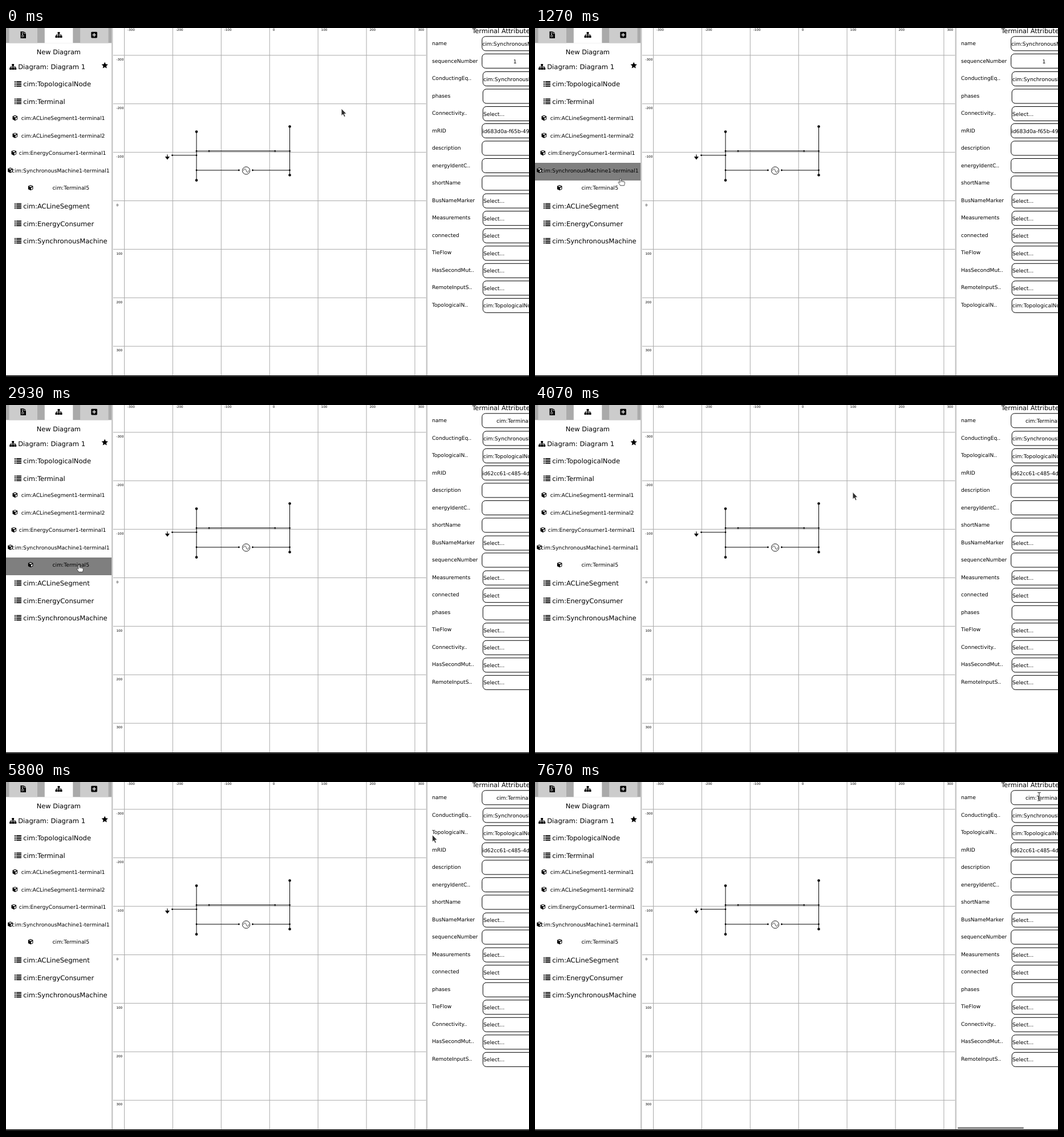
Recreate the animation shown at these times as an HTML page. Size 917 px wide and 611 px high, loop 8000 ms.

```html
<!DOCTYPE html>
<html lang="en">
<head>
<meta charset="utf-8">
<title>Diagram editor</title>
<style>
html, body { margin: 0; width: 100%; height: 100%; overflow: hidden; background: #fff; }
svg { display: block; width: 917px; height: 611px; }
text { font-family: "DejaVu Sans", sans-serif; text-rendering: geometricPrecision; fill: #000; white-space: pre; }
</style>
</head>
<body>
<svg viewBox="0 0 917 611" xmlns="http://www.w3.org/2000/svg">
  <defs>
    <path id="list" d="M0 1H2M0 3.7H2M0 6.4H2M0 9.1H2M3 1H12M3 3.7H12M3 6.4H12M3 9.1H12" stroke="#000" stroke-width="1.7"/>
    <g id="cube">
      <path d="M0-4.6L4.3-2.9V2.6L0 4.7-4.3 2.6V-2.9Z"/>
      <path d="M0-3.4L3-2.2 0-1 -3-2.2ZM.7.3L3.3-.8V2L.7 3.3Z" fill="#fff"/>
    </g>
    <g id="tree">
      <path d="M-1.9-5H1.9V-1.5H-1.9ZM-6 1.6H-2.3V5H-6ZM-1.9 1.6H1.9V5H-1.9ZM2.3 1.6H6V5H2.3Z"/>
      <path d="M0-2V2M-4.2 2V0H4.2V2" fill="none" stroke="#000" stroke-width="1.1"/>
    </g>
    <path id="ibeam" d="M-2.8-7.2H-1Q0-7.2 0-6.2 0-7.2 1-7.2H2.8M0-6.4V6.4M-2.8 7.2H-1Q0 7.2 0 6.2 0 7.2 1 7.2H2.8"/>
  </defs>
  <g id="side"></g>
  <g id="canvas"></g>
  <g id="before"></g>
  <g id="after"></g>
  <rect y="608" width="917" height="3" fill="#242424"/>
  <rect id="bar" x="741" y="604.4" width="116" height="2.6" rx="1.3" fill="#707070"/>
  <g id="arrow">
    <path d="M0 0V12.7L2.9 10.1 4.9 14.7 7.1 13.7 5.1 9.3H9Z" fill="#2e2e2e" stroke="#fff" stroke-width=".9"/>
  </g>
  <g id="hand" stroke="#222" stroke-width=".8">
    <path d="M-1.2 1C-1.2-.5 1-.5 1 1V4.6C1.6 3.8 2.9 4 3.1 4.9 3.8 4.3 5 4.6 5.2 5.5 6.1 5 7.3 5.4 7.3 6.6V9C7.3 10.3 6.5 10.7 6.4 12.3H-.6C-1 10.6-3.4 8.4-4 6.8-4.2 5.8-3 5.4-2.3 6.2L-1.2 7.4Z" fill="#fff"/>
    <path d="M1 4.6V6.6M3.1 5V6.6M5.2 5.6V6.8" stroke-width=".5"/>
  </g>
  <g id="beam" fill="none">
    <use href="#ibeam" stroke="#fff" stroke-width="2"/>
    <use href="#ibeam" stroke="#222"/>
  </g>
</svg>
<script>
const $ = id => document.getElementById(id);
const ROW = 30.53, SIDE = 185, LOOP = 8000;

const text = (x, y, size, s, anchor = 'start') =>
  `<text x="${x}" y="${y}" font-size="${size}" text-anchor="${anchor}">${s}</text>`;
const rect = (x, y, w, h, fill) =>
  `<rect x="${x}" y="${y}" width="${w}" height="${h}" fill="${fill}"/>`;
const path = (d, stroke = '#000', width = 1) =>
  `<path d="${d}" fill="none" stroke="${stroke}" stroke-width="${width}"/>`;
const dot = (x, y, r) => `<circle cx="${x}" cy="${y}" r="${r}"/>`;
const use = (id, x, y) => `<use href="#${id}" x="${x}" y="${y}"/>`;

function tabs() {
  const fills = ['#ccc', '#fff', '#ccc'];
  return rect(0, 0, SIDE, 26.3, '#aaa') +
    fills.map((f, i) => rect(5.5 + 62.3 * i, 0, 49.5, 26.5, f)).join('') +
    '<path d="M25.5 6H31.7L35 9.3V18H25.5Z"/>' +
    path('M31.4 6V9.6H35', '#ccc', .8) + path('M28.8 7V12', '#ccc', 1.2) +
    '<circle cx="29.4" cy="14" r="1.7" fill="none" stroke="#ccc"/>' +
    use('tree', 92.5, 12) +
    '<rect x="149.3" y="6.8" width="10.6" height="10.6" rx="1.4"/>' +
    path('M154.6 9V15.2M151.5 12.1H157.7', '#ccc', 1.9);
}

function star(cx, cy) {
  const points = Array.from({ length: 10 }, (_, i) => {
    const a = i * Math.PI / 5, r = i % 2 ? 2.8 : 6;
    return [cx + r * Math.sin(a), cy - r * Math.cos(a)];
  });
  return `<polygon points="${points.join(' ')}"/>`;
}

const tree = [
  'TopologicalNode', 'Terminal', '-ACLineSegment1-terminal1', '-ACLineSegment1-terminal2',
  '-EnergyConsumer1-terminal1', '-SynchronousMachine1-terminal1', '-Terminal5',
  'ACLineSegment', 'EnergyConsumer', 'SynchronousMachine'
];

function sidebar() {
  let s = tabs() + `<rect id="hover" width="${SIDE}" height="31" fill="#7f7f7f"/>`;
  s += text(92.4, 45.7, 11.35, 'New Diagram', 'middle');
  s += use('tree', 12.2, 68) + text(21.2, 71.9, 11.57, 'Diagram: Diagram 1') + star(173.2, 65.6);
  tree.forEach((name, i) => {
    const y = 102.4 + ROW * i;
    s += name[0] === '-'
      ? `<g class="leaf">${use('cube', 0, y - 6)}${text(0, y - 2.4, 9.22, 'cim:' + name.slice(1))}</g>`
      : use('list', 15, y - 9.6) + text(30.2, y, 11.55, 'cim:' + name);
  });
  return s;
}

// Spread icon and label evenly over the row
function spread(leaf) {
  const [icon, label] = leaf.children;
  const gap = (SIDE - 3.6 - label.getComputedTextLength()) / 3;
  icon.setAttribute('x', gap + 4.2);
  label.setAttribute('x', 2 * gap + 3.6);
}

function diagram() {
  let s = rect(185, 0, 2.4, 608, '#c6c6c6') + rect(736.6, 0, 2.4, 608, '#c6c6c6');
  for (let i = 0; i < 7; i++) {
    const x = 207.5 + 84.9 * i, y = 47.8 + 84.9 * i, n = (i - 3) * 100;
    s += path(`M${x} 0V608M188 ${y}H736.6`, '#aaa');
    s += text(x + 5.5, 5.4, 5.6, n) + text(193.5, y + 9.2, 5.6, n);
  }
  const left = 334, right = 497.5;
  const bus = (x, y) => path(`M${x} ${y}v85`) + dot(x, y, 2.3) + dot(x, y + 85, 2.3);
  const wire = (a, b, y) => path(`M${a} ${y}H${b}`) + dot(a, y, 1.4) + dot(b, y, 1.4);
  s += bus(left, 181.6) + bus(right, 172.5);
  s += wire(left, right, 215.4) + wire(356, 471.7, 215.4) + wire(291.5, left, 222.8);
  s += wire(left, 408.4, 249) + wire(432.4, right, 249);
  s += path('M282.9 221.5V226', '#000', 1.2) + '<path d="M278.8 225.2H287L282.9 230.4Z"/>';
  s += '<circle cx="421.1" cy="249.6" r="6.6" fill="#fff" stroke="#000" stroke-width=".9"/>' +
    path('M416.6 249.8C418 245.4 419.6 245.4 421.1 249.6S424.2 253.8 425.6 249.4', '#000', .8);
  return s;
}

const field = (name, value = '', x = 835.2) => ({ name, value, x, shift: 0 });
const pick = (name, value = 'Select...') => ({ name, value, x: 837, shift: 1 });

function panel(fields) {
  let s = text(817.4, 9, 11.3, 'Terminal Attributes');
  fields.forEach(({ name, value, x, shift }, i) => {
    const y = ROW * i;
    s += text(747, 30 + y, 9.1, name);
    s += `<rect x="${834.7 + shift * 1.5}" y="${14.8 + shift * .6 + y}" width="115" height="25" rx="6" fill="#fff" stroke="#000"/>`;
    s += text(x, 31.2 + shift * .3 + y, 9.2, value);
  });
  return s;
}

const machine = 'cim:SynchronousMachine1', node = 'cim:TopologicalNode1';
const before = [
  field('name', machine + '-terminal1'), field('sequenceNumber', '1', 889.5),
  pick('ConductingEq..', machine), pick('phases', ''), pick('Connectivity..'),
  field('mRID', 'id683d0a-f65b-49'), field('description'), field('energyIdentC..'), field('shortName'),
  pick('BusNameMarker'), pick('Measurements'), pick('connected', 'Select'), pick('TieFlow'),
  pick('HasSecondMut..'), pick('RemoteInputS..'), pick('TopologicalN..', node)
];
const after = [
  field('name', 'cim:Terminal5', 860), pick('ConductingEq..', machine), pick('TopologicalN..', node),
  field('mRID', 'id62cc61-c485-4d'), field('description'), field('energyIdentC..'), field('shortName'),
  pick('BusNameMarker'), field('sequenceNumber'), pick('Measurements'), pick('connected', 'Select'),
  pick('phases', ''), pick('TieFlow'), pick('Connectivity..'), pick('HasSecondMut..'), pick('RemoteInputS..')
];

$('side').innerHTML = sidebar();
document.querySelectorAll('.leaf').forEach(spread);
$('canvas').innerHTML = diagram();
$('before').innerHTML = panel(before);
$('after').innerHTML = panel(after);

// Pointer moves at 15 ticks per second; power > 1 slows down, < 1 speeds up
const move = (from, ticks, x, y, power = 1) => ({ from, ticks, x, y, power });
const moves = [
  move(6, 5, 269, 222),
  move(14, 5, 150, 263.5),
  move(19, 4, 128, 280, 2),
  move(53, 3, 544, 156),
  move(60, 3, 679, 119, .25),
  move(67, 3, 729, 96),
  move(86, 3, 784, 85),
  move(92, 8, 881, 17, 2.4),
  move(105, 10, 884, 25.6)
];

function pointer(k) {
  let x = 588, y = 141;
  for (const m of moves) {
    const u = Math.min(1, Math.max(0, (k - m.from) / m.ticks));
    const e = 1 - (1 - u) ** m.power;
    x += (m.x - x) * e;
    y += (m.y - y) * e;
  }
  return [x, y];
}

const show = (id, on) => $(id).setAttribute('visibility', on ? 'visible' : 'hidden');

function draw(t) {
  const k = Math.floor(t * .015 + .06);
  const [x, y] = pointer(k);
  const shape = x < SIDE ? 'hand' : x > 835 && y > 15 && y < 40 ? 'beam' : 'arrow';
  for (const id of ['arrow', 'hand', 'beam']) show(id, id === shape);
  $(shape).setAttribute('transform', `translate(${x} ${y})`);
  show('hover', shape === 'hand');
  $('hover').setAttribute('y', y > 267 ? 267 : 236);
  show('before', k < 44);
  show('after', k >= 44);
  show('bar', k >= 88);
}

const start = performance.now();
function tick() {
  draw((performance.now() - start) % LOOP);
  requestAnimationFrame(tick);
}
tick();
</script>
</body>
</html>
```
